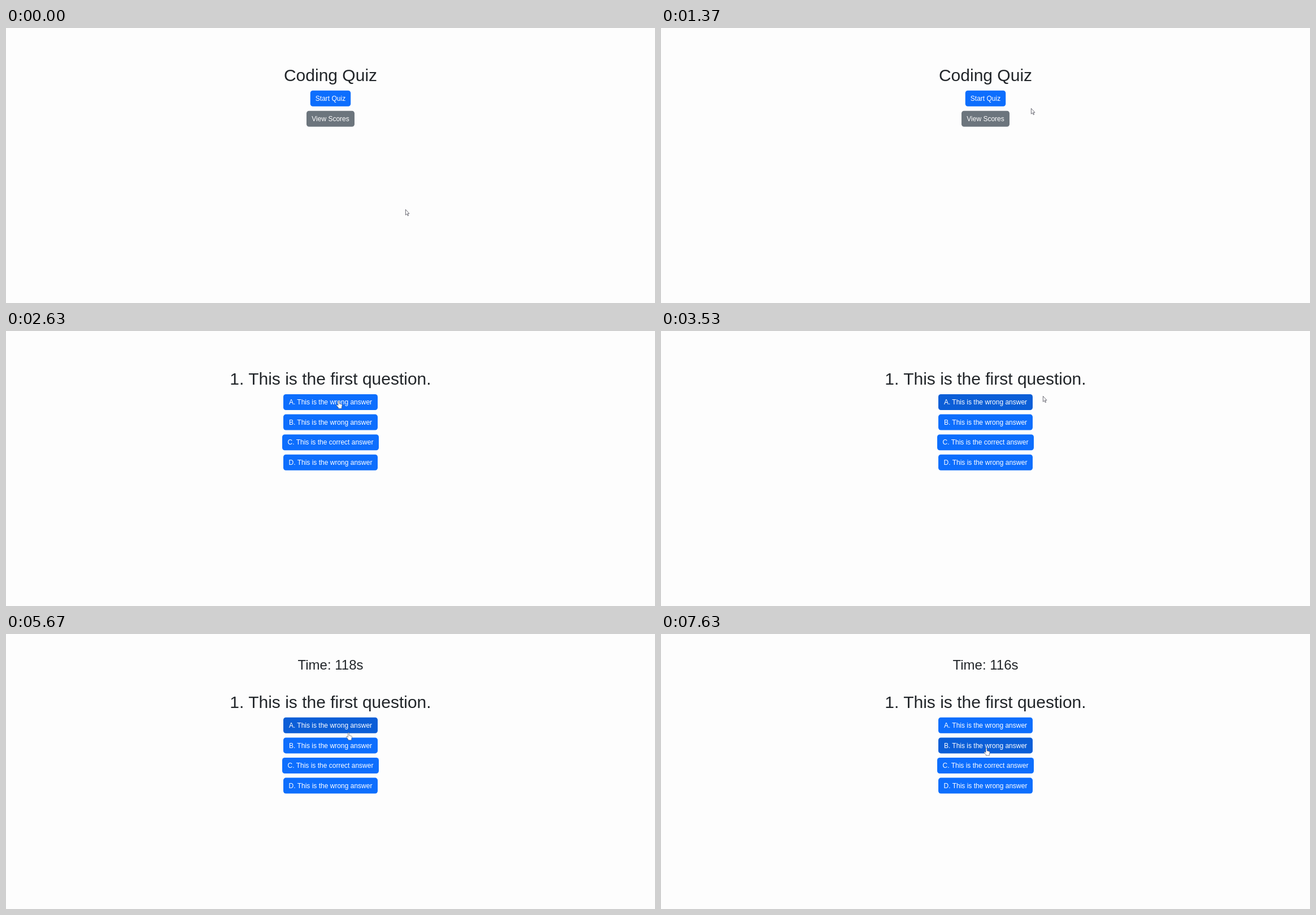
Recreate the animation shown at these times as an HTML page. Size 1149 by 487 pixels, loop 8000 ms.

```html
<!DOCTYPE html>
<html lang="en">
<head>
<meta charset="utf-8">
<title>Coding Quiz</title>
<style>
  html, body { margin: 0; width: 100%; height: 100%; overflow: hidden; background: #fdfdfd; }
  svg { display: block; width: 100vw; height: 100vh; }
  text { font-family: "Liberation Sans", Arial, sans-serif; text-anchor: middle; fill: #212529; }
  .btn text { font-size: 12px; fill: #fff; }
</style>
</head>
<body>
<svg id="stage" viewBox="0 0 1149 487">
  <g id="home">
    <text x="574.5" y="93.5" font-size="30">Coding Quiz</text>
  </g>
  <g id="quiz">
    <text x="574.5" y="95" font-size="30">1. This is the first question.</text>
  </g>
  <text id="timer" x="574.5" y="63" font-size="24"></text>
  <path id="arrow" d="M.4 .4V10.2L2.7 8.2L4.3 11.7L5.6 11.1L4.1 7.7H7Z"
    fill="#fff" stroke="#4a4a55" stroke-width=".8" stroke-linejoin="round"/>
  <path id="hand" d="M-1 1Q-1 0 0 0T1.1 1V5L2.3 5.1L5.2 6Q6.3 6.3 6.2 7.5L5.4 11V13.2H-.6V11.6L-3.6 8.2Q-4.3 7.2-3.4 6.7T-1 8Z"
    fill="#fff" stroke="#3b4252" stroke-width=".6" stroke-linejoin="round"/>
</svg>
<script>
const LOOP = 8000, OPEN = 2630, WAKE = 3030, TICK = 3630, SHIFT = 35.8, FADE = 150;
const BLUE = [13, 110, 253], BLUE_HOVER = [11, 94, 215], BLUE_DOWN = [10, 88, 202];
const GRAY = [108, 117, 125], GRAY_HOVER = [92, 99, 106];
const $ = id => document.getElementById(id);
const clamp = v => Math.max(0, Math.min(1, v));
const mix = (a, b, k) => a + (b - a) * k;
const show = (el, on) => el.setAttribute('display', on ? 'inline' : 'none');
const move = (el, x, y) => el.setAttribute('transform', `translate(${x} ${y})`);

function node(tag, parent, attrs, label = '') {
  const el = document.createElementNS('http://www.w3.org/2000/svg', tag);
  for (const key in attrs) el.setAttribute(key, attrs[key]);
  el.textContent = label;
  return parent.appendChild(el);
}

function button(page, label, y, w, color = BLUE, over = BLUE_HOVER) {
  const g = node('g', $(page), { class: 'btn' });
  const x = 574.5 - w / 2;
  const rect = node('rect', g, { x, y, width: w, height: 28, rx: 4.5 });
  node('text', g, { x: 574.5, y: y + 18.2 }, label);
  return { page, x, y, w, color, over, rect };
}

const start = button('home', 'Start Quiz', 110.8, 71.5);
const buttons = [start, button('home', 'View Scores', 146.7, 85, GRAY, GRAY_HOVER)];
['wrong', 'wrong', 'correct', 'wrong'].forEach((word, i) =>
  buttons.push(button('quiz', `${'ABCD'[i]}. This is the ${word} answer`,
    112 + i * 35.6, word === 'correct' ? 171 : 167)));

// time, x, y of the pointer tip; the last item marks steady speed
const path = [
  [0, 707, 321], [600, 707, 321], [1370, 655, 142], [1530, 655, 142],
  [2070, 589, 124], [WAKE, 589, 124], [3495, 654, 120], [3530, 676, 115, 1],
  [3730, 686, 120], [5170, 686, 120], [5930, 577, 195], [6000, 577, 195],
  [6070, 577, 197], [6300, 577, 197], [6370, 577, 199], [7230, 577, 199],
  [7330, 576, 202], [LOOP, 576, 202]
];

function pointer(t) {
  const i = Math.max(1, path.findIndex(p => p[0] >= t));
  const [a, b] = [path[i - 1], path[i]];
  let k = clamp((t - a[0]) / (b[0] - a[0]));
  if (!b[3]) k *= k * (3 - 2 * k);
  return [mix(a[1], b[1], k), mix(a[2], b[2], k)];
}

const pageAt = t => t < OPEN ? 'home' : 'quiz';
const shiftAt = t => t < TICK ? 0 : SHIFT;

function inside(b, t) {
  const [x, y] = pointer(t), top = b.y + shiftAt(t);
  return b.page === pageAt(t) && x >= b.x && x <= b.x + b.w && y >= top && y <= top + 28;
}

// share of the last moments spent under the pointer gives the fade
function hover(b, t) {
  let n = 0;
  for (let i = 0; i < 15; i++) {
    const s = t - 30 - i * FADE / 15;
    if (s > 0 && (s < OPEN || s >= WAKE) && inside(b, s)) n++;
  }
  return n / 15;
}

function draw(t) {
  const page = pageAt(t), shift = shiftAt(t), [x, y] = pointer(t);
  show($('home'), page === 'home');
  show($('quiz'), page === 'quiz');
  move($('quiz'), 0, shift);
  show($('timer'), t >= TICK);
  $('timer').textContent = `Time: ${120 - Math.max(0, Math.floor((t - TICK) / 1000))}s`;

  for (const b of buttons) {
    const k = hover(b, t), press = b === start ? clamp((t - 2400) / FADE) : 0;
    const rgb = b.color.map((c, i) => Math.round(mix(mix(c, b.over[i], k), BLUE_DOWN[i], press)));
    b.rect.setAttribute('fill', `rgb(${rgb})`);
  }

  const onButton = buttons.some(b => inside(b, t));
  const onText = page === 'quiz' && y > 68 + shift && y < 103 + shift;
  show($('hand'), onButton);
  show($('arrow'), !onButton && !onText);
  move($('hand'), x, y);
  move($('arrow'), x, y);
}

function frame() {
  draw(performance.now() % LOOP);
  requestAnimationFrame(frame);
}
frame();
</script>
</body>
</html>
```
